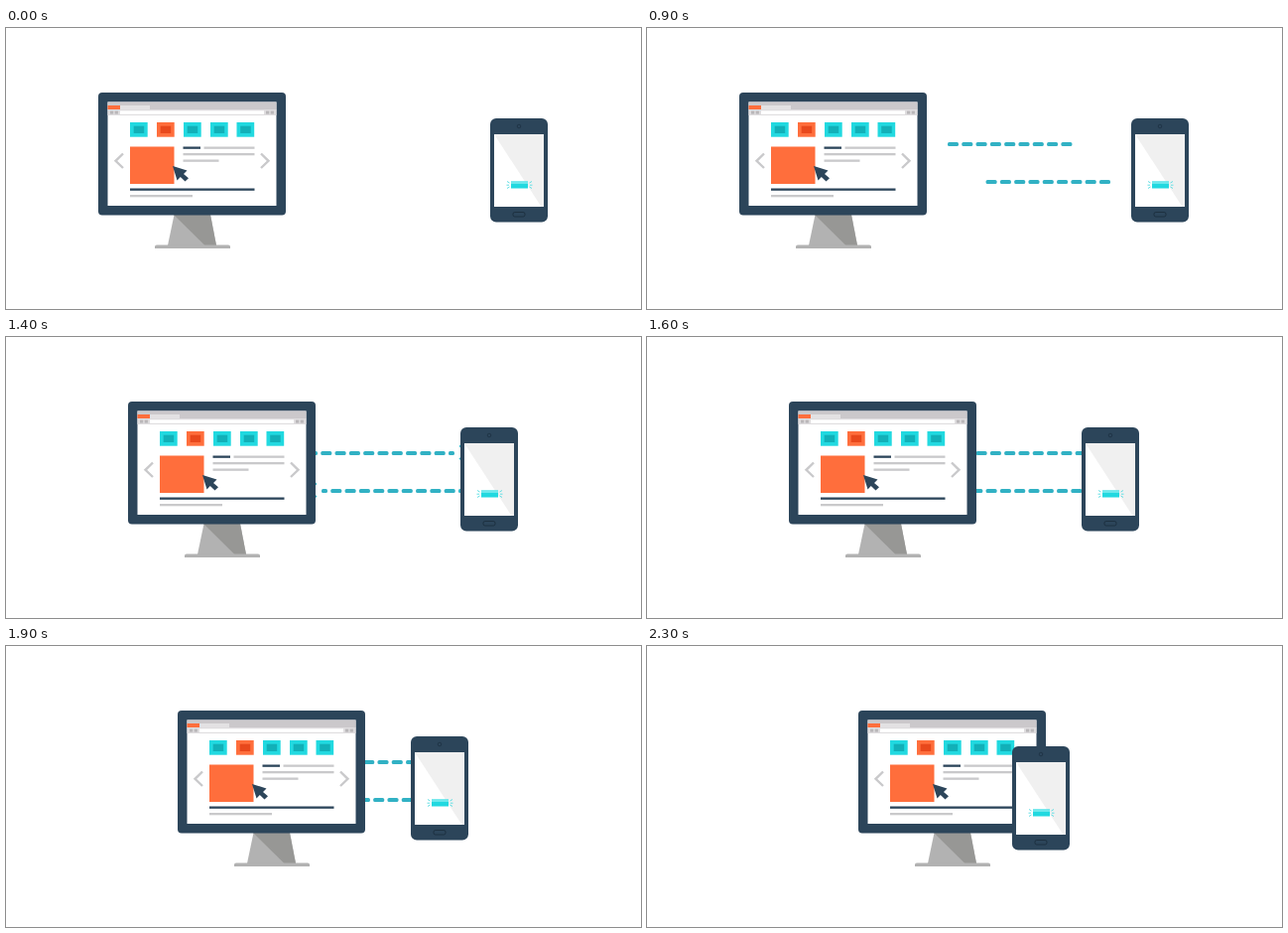
Recreate the animation shown at these times as an HTML page. Size 640 by 283 pixels, loop 2400 ms.

```html
<!DOCTYPE html>
<html lang="en">
<head>
<meta charset="utf-8">
<title>Desktop and phone</title>
<style>
html, body { margin: 0; width: 100%; height: 100%; overflow: hidden; background: #fff; }
svg { display: block; width: 640px; height: 283px; }
.navy { fill: #2c455a; }
.grey { fill: #c9c9cb; }
.stroke { fill: none; stroke: #c9c9cb; stroke-width: 2.4; }
.teal { fill: #31b1c4; }
.arrow { fill: none; stroke: #31b1c4; stroke-width: 3; }
</style>
</head>
<body>
<svg viewBox="0 0 640 283">
  <defs>
    <clipPath id="gap"><rect id="gapBox" y="0" height="283"/></clipPath>
  </defs>

  <g clip-path="url(#gap)">
    <g class="row"></g>
    <g class="row" transform="translate(770 38) scale(-1 1)"></g>
  </g>

  <g id="monitor">
    <path fill="#b2b2b2" d="M169.500 188H206L212 219H163Z"/>
    <path fill="#979795" d="M169 188H206L212 219H200.500Z"/>
    <path fill="#b2b2b2" d="M150 222V220Q150 218.500 152 218.500H224Q226 218.500 226 220V222Z"/>
    <rect class="navy" x="93" y="65" width="189" height="123.500" rx="4"/>
    <rect fill="#fff" x="102.500" y="74.500" width="170" height="104.500"/>
    <rect fill="#cbc8cb" x="102.500" y="74.500" width="170" height="8"/>
    <rect fill="#ff6e3c" x="102.500" y="78" width="12.500" height="4"/>
    <rect fill="#e3e1e3" x="115" y="78" width="30" height="4"/>
    <rect fill="#dedcde" x="102.500" y="82" width="170" height="6"/>
    <rect fill="#fff" x="115" y="83.300" width="145" height="3.700"/>
    <g id="controls" fill="#b9b7b9"></g>
    <g id="tiles"></g>
    <rect fill="#ff6e3c" x="125" y="119.500" width="44.500" height="37.500"/>
    <g id="lines"></g>
    <path class="stroke" d="M118 126.500L110.500 133.800L118 141M257 126.500L264.500 133.800L257 141"/>
    <path class="navy" d="M168 139L182.500 143.500L179 147L184 151.300L180.500 154.500L175.800 150L172.500 153.500Z"/>
  </g>

  <g id="phone">
    <rect class="navy" x="488" y="91" width="58" height="104.500" rx="6"/>
    <rect fill="#fff" x="492" y="107" width="50" height="73"/>
    <path fill="#f0f0f0" d="M492 107H542V180H539.500Z"/>
    <circle cx="517" cy="99" r="1.800" fill="#2c455a" stroke="#203547" stroke-width="1"/>
    <rect x="511" y="185.500" width="12" height="4.500" rx="1.800" fill="#2c455a" stroke="#1d3040" stroke-width="1"/>
    <rect fill="#21d9e0" x="509" y="154.500" width="17" height="7"/>
    <rect fill="#6be8ec" x="509" y="154.500" width="17" height="2.500"/>
    <path fill="none" stroke="#62dfe4" stroke-width="1"
      d="M505 154.500L507.500 156M504.500 158.200H507M505 161.500L507.500 160M530 154.500L527.500 156M530.500 158.200H528M530 161.500L527.500 160"/>
  </g>
</svg>
<script>
const STEP = 100, LOOP = 2400, DASHES = 11, PITCH = 14.3;
const $ = id => document.getElementById(id);

function add(parent, tag, attrs) {
  const el = document.createElementNS("http://www.w3.org/2000/svg", tag);
  for (const key in attrs) el.setAttribute(key, attrs[key]);
  parent.appendChild(el);
  return el;
}
const box = (parent, x, y, width, height, more) =>
  add(parent, "rect", { x, y, width, height, ...more });

for (const x of [105, 109.7, 262, 266.7]) box($("controls"), x, 83.6, 3.2, 3);

[125, 152, 179, 206, 232.5].forEach((x, i) => {
  const hot = i === 1;
  box($("tiles"), x, 95, 17.7, 14.7, { fill: hot ? "#ff6e3c" : "#21d9e0" });
  box($("tiles"), x + 3.7, 98.7, 10.5, 7.3, { fill: hot ? "#e8481c" : "#12b0b8" });
});

for (const [x, y, w, tone] of [
  [178.5, 119.5, 17.5, "navy"], [199.5, 119.5, 51, "grey"],
  [178.5, 126, 72, "grey"], [178.5, 132.5, 36, "grey"],
  [125, 161.5, 125.5, "navy"], [125, 168, 63, "grey"]
]) box($("lines"), x, y, w, 2.3, { class: tone });

const rows = [...document.querySelectorAll(".row")].map(row => {
  const parts = [];
  for (let i = 0; i < DASHES; i++) {
    const x = 303 + i * PITCH;
    parts.push(box(row, x, 115, Math.min(11, 452 - x), 4, { rx: 1.6, class: "teal" }));
  }
  parts.push(add(row, "path", { d: "M457.500 109L465.500 116.200L457.500 123.500", class: "arrow" }));
  return parts;
});

function draw(now) {
  const step = Math.floor((now % LOOP) / STEP);
  const shift = Math.max(0, step - 11) * 10;
  const drop = Math.max(0, step - 21) * 5;

  for (const parts of rows)
    parts.forEach((part, i) => part.setAttribute("visibility", i < step ? "visible" : "hidden"));

  $("monitor").setAttribute("transform", `translate(${shift} 0)`);
  $("phone").setAttribute("transform", `translate(${-shift} ${drop})`);

  // Links show only between the two devices.
  const left = 280 + shift;
  $("gapBox").setAttribute("x", left);
  $("gapBox").setAttribute("width", Math.max(0, 490 - shift - left));
}

let start;
function tick(now) {
  start ??= now;
  draw(now - start);
  requestAnimationFrame(tick);
}
draw(0);
requestAnimationFrame(tick);
</script>
</body>
</html>
```
